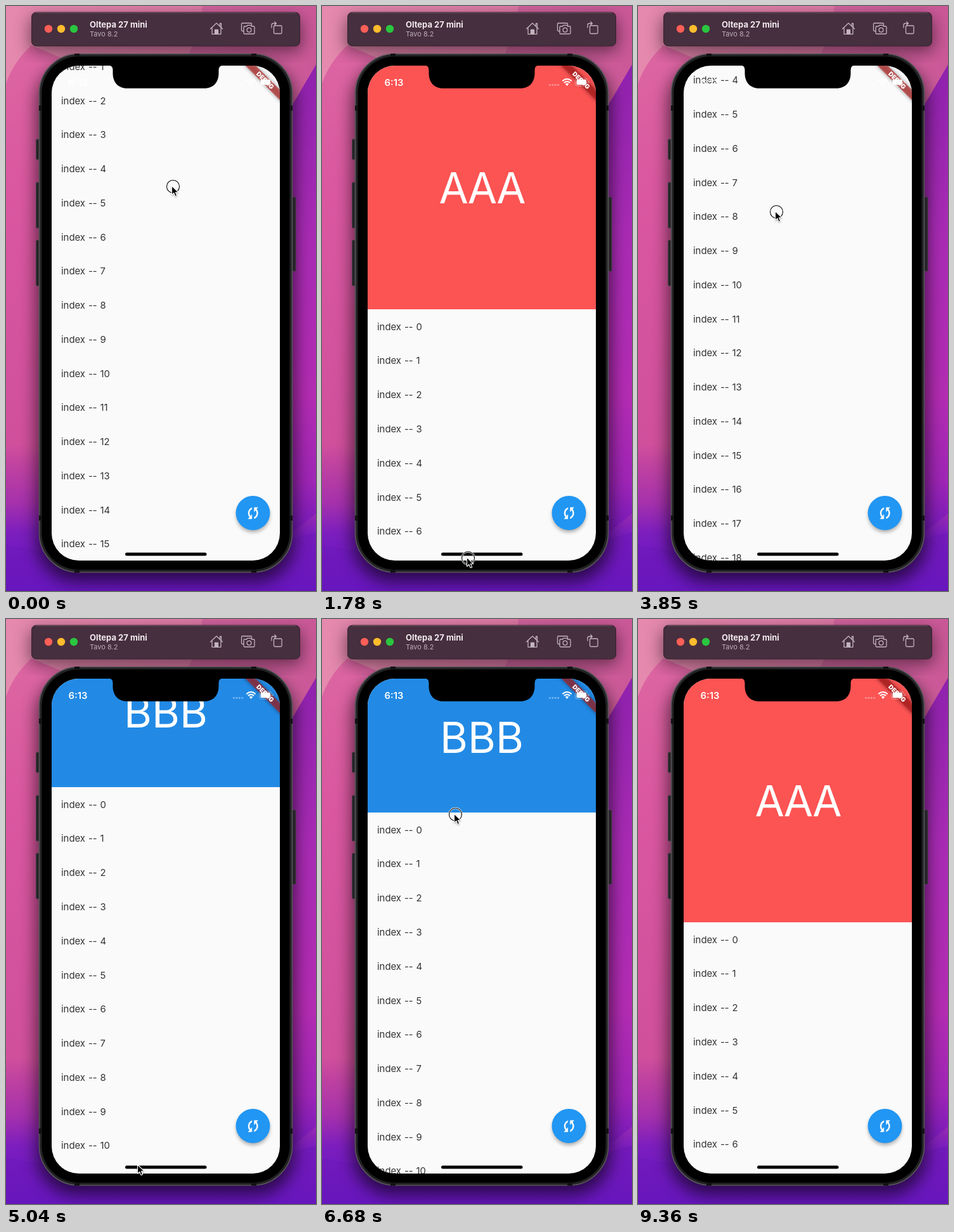
An HTML page that plays this animation: 489x922 px, repeating every 9510 ms.

```html
<!DOCTYPE html>
<html lang="en">
<head>
<meta charset="utf-8">
<title>List with a changing header</title>
<style>
  html, body { margin: 0; width: 100%; height: 100%; overflow: hidden; background: #a32bb0; }
  svg { display: block; width: 489px; height: 922px; }
  text { font-family: Inter, Roboto, "Liberation Sans", sans-serif; }
  .row { font-size: 14.9px; word-spacing: .7px; fill: #333; }
  .big { font-size: 67.2px; fill: #fff; text-anchor: middle; }
  .line { fill: none; stroke: #c3b4be; stroke-width: 1.3; stroke-linejoin: round; stroke-linecap: round; }
</style>
</head>
<body>
<svg viewBox="0 0 489 922" xmlns="http://www.w3.org/2000/svg">
  <defs>
    <linearGradient id="left" x2="0" y2="1">
      <stop offset="0" stop-color="#dd6aa3"/>
      <stop offset=".3" stop-color="#da58a0"/>
      <stop offset=".75" stop-color="#d0509c"/>
      <stop offset=".78" stop-color="#c2449f"/>
      <stop offset=".85" stop-color="#a531ac"/>
      <stop offset=".9" stop-color="#7d1ebe"/>
      <stop offset="1" stop-color="#5d14c4"/>
    </linearGradient>
    <linearGradient id="right" x2="0" y2="1">
      <stop offset="0" stop-color="#8f22ae"/>
      <stop offset=".35" stop-color="#a82bb4"/>
      <stop offset=".7" stop-color="#b32cb2"/>
      <stop offset=".88" stop-color="#9e25b6"/>
      <stop offset="1" stop-color="#7018bc"/>
    </linearGradient>
    <linearGradient id="top">
      <stop offset="0" stop-color="#e58aae"/>
      <stop offset=".6" stop-color="#df7aa6"/>
      <stop offset="1" stop-color="#cf5c98"/>
    </linearGradient>
    <filter id="blur" x="-30%" y="-30%" width="160%" height="160%"><feGaussianBlur stdDeviation="13"/></filter>
    <filter id="soft" x="-50%" y="-50%" width="200%" height="200%"><feGaussianBlur stdDeviation="3"/></filter>
    <clipPath id="screen"><rect x="72" y="94" width="360" height="780" rx="43"/></clipPath>
  </defs>

  <!-- wallpaper -->
  <rect width="489" height="922" fill="url(#left)"/>
  <path d="M489 92L440 175V840L489 800Z" fill="url(#right)"/>
  <path d="M0 0H489V92L455 150H250L40 62Q12 88 0 122Z" fill="url(#top)"/>
  <path d="M310 0H489V92L455 150H240Q300 80 310 0Z" fill="#c9569a" opacity=".55"/>
  <path d="M0 850L250 890L489 830V922H0Z" fill="#6f18ba" opacity=".6"/>

  <!-- window bar -->
  <rect x="38" y="18" width="428" height="54" rx="8" filter="url(#blur)" opacity=".5"/>
  <rect x="40.5" y="10" width="423" height="53" rx="7" fill="#462f3e" stroke="#34232f"/>
  <path d="M47 10.8H457" stroke="#75606c" stroke-width=".8"/>
  <circle cx="67" cy="36" r="6.2" fill="#fe5f57"/>
  <circle cx="87" cy="36" r="6.2" fill="#febc2e"/>
  <circle cx="107" cy="36" r="6.2" fill="#2ac63f"/>
  <text x="132" y="34" font-size="13" font-weight="700" fill="#f2eaef">Oltepa 27 mini</text>
  <text x="132" y="48" font-size="11" fill="#bcaeb7">Tavo 8.2</text>
  <g class="line">
    <path d="M322.5 36L332 27L341.5 36M325 34V44.3H339V34M337.5 31V27.5H339.5V33"/>
    <path d="M329.5 44V37.5H334.5V44Z" fill="#c3b4be"/>
    <path d="M374.5 39.5H373Q371.5 39.5 371.5 38V28.5Q371.5 27 373 27H386Q387.5 27 387.5 28.5V30"/>
    <path d="M376.5 32H379.5L381 30.3H386L387.5 32H390.5Q392 32 392 33.5V42.5Q392 44 390.5 44H376.5Q375 44 375 42.5V33.5Q375 32 376.5 32Z"/>
    <circle cx="383.5" cy="37.8" r="3.4"/>
    <rect x="422.5" y="31" width="12.5" height="12.5" rx="1.5"/>
    <path d="M419 34V30Q419 27.5 421.5 27.5H426M423.8 25L426.3 27.5L423.8 30"/>
  </g>

  <!-- device -->
  <rect x="48" y="88" width="408" height="820" rx="64" filter="url(#blur)" opacity=".6"/>
  <g fill="#252427" stroke="#48424a" stroke-width=".8">
    <rect x="47.5" y="210" width="7" height="32" rx="1.5"/>
    <rect x="47.5" y="278" width="7" height="72" rx="1.5"/>
    <rect x="47.5" y="369" width="7" height="72" rx="1.5"/>
    <rect x="450" y="301" width="7" height="117" rx="1.5"/>
  </g>
  <rect x="52.5" y="75.5" width="399" height="817" rx="62" fill="#232325" stroke="#59565a" stroke-width="1.6"/>
  <path d="M108 77H116M387 77H395M108 891H116M387 891H395M54 157V165M450 157V165M54 803V811M450 803V811" stroke="#121213" stroke-width="4"/>
  <rect x="56.5" y="79.5" width="391" height="809" rx="58" fill="#000"/>

  <g clip-path="url(#screen)">
    <rect x="72" y="94" width="360" height="780" fill="#fafafa"/>
    <rect id="header" x="72" y="94" width="360"/>
    <text id="title" class="big" x="252"></text>
    <g id="list"></g>

    <circle cx="389.5" cy="803" r="26" filter="url(#soft)" opacity=".35"/>
    <circle cx="389.5" cy="799" r="27" fill="#2196f3"/>
    <g transform="translate(389.7 799.3) scale(.96 1.12)" fill="#fff" stroke="#fff" stroke-width=".5">
      <path id="arrow" d="M-2-7.740C-5.450-6.850-8-3.730-8 0C-8 2.210-7.090 4.200-5.640 5.640L-8 8H-2V2L-4.240 4.240C-5.320 3.150-6 1.660-6 0C-6-2.610-4.330-4.830-2-5.650Z"/>
      <use href="#arrow" transform="rotate(180)"/>
    </g>

    <g transform="translate(432 94) rotate(45)">
      <rect x="-60" y="27" width="120" height="11.5" filter="url(#soft)" opacity=".4"/>
      <rect x="-60" y="26.9" width="120" height="11.5" fill="#b71c1c" fill-opacity=".63"/>
      <text y="36.2" font-size="9.8" font-weight="900" fill="#fff" text-anchor="middle">DEBUG</text>
    </g>

    <g fill="#fff">
      <text x="98.5" y="125.6" font-size="14.8" font-weight="600">6:13</text>
      <g opacity=".35">
        <circle cx="359.5" cy="124.3" r="1.6"/><circle cx="363.9" cy="124.3" r="1.6"/>
        <circle cx="368.3" cy="124.3" r="1.6"/><circle cx="372.7" cy="124.3" r="1.6"/>
      </g>
      <path d="M386.5 126L383.7 122.8Q386.5 120.8 389.3 122.8Z"/>
      <path d="M381.8 121Q386.5 117 391.2 121M379.3 118.2Q386.5 111.8 393.7 118.2" fill="none" stroke="#fff" stroke-width="2"/>
      <rect x="401.5" y="115.8" width="15.5" height="8.4" rx="2"/>
      <rect x="399.5" y="113.9" width="19.5" height="12.2" rx="3.5" fill="none" stroke="#fff" stroke-opacity=".4"/>
      <path d="M420.3 118V122Q421.8 121.5 421.8 120T420.3 118Z" opacity=".45"/>
    </g>
    <rect x="188" y="861.5" width="128.5" height="5" rx="2.5"/>
  </g>
  <path d="M162 93.5Q168.5 94 168.5 101V106C168.500 120 177 129.800 191 129.800H313C327 129.800 335.500 120 335.500 106V101Q335.5 94 342 93.5Z"/>

  <g id="cursor">
    <g id="ring" fill="none">
      <circle r="10" stroke="#fff" stroke-width="2.4"/>
      <circle r="10" stroke="#000" stroke-width="1.1"/>
    </g>
    <path d="M-2-1V13.3L1.3 10.2L3.6 15.6L6.2 14.5L3.9 9.2H8.4Z" stroke="#fff" stroke-width="1.1" stroke-linejoin="round" style="filter:drop-shadow(0 1px 1px rgba(0,0,0,.35))"/>
  </g>
</svg>
<script>
const $ = id => document.getElementById(id);
const LOOP = 9510, TOP = 94, PITCH = 53.76;
const RED = { name: 'AAA', fill: '#fc5353', height: 384, spacing: -2 };
const BLUE = { name: 'BBB', fill: '#228ae5', height: 238, spacing: 0 };

const shortTicks = [0, 5, 14, 20, 25, 30, 42, 45, 50];
const starts = Array.from({ length: 64 }, (_, k) =>
  150 * k - 10 * shortTicks.filter(s => s < k).length);

const ease = {
  both: p => (1 - Math.cos(Math.PI * p)) / 2,
  in: p => p * p,
  out: p => p * (2 - p)
};

// time, pointer x, pointer y, top of the list, pressed, easing
const keys = [
  [0, 263.5, 284.5, 14.3, 1],
  [140, 263.5, 284.5, 14.3, 0],
  [290, 263.5, 284.5, 14.3, 0],
  [1780, 230.5, 870, 600, 1],
  [2670, 222, 318, -74, 1],
  [2820, 222, 318, -74, 1],
  [3260, 224, 783, 391, 1],
  [3850, 218.5, 324.5, -125.5, 1],
  [4000, 218, 310, -140, 1],
  [4450, 213, 560, 110, 1, 'in'],
  [5040, 209.5, 861, 265, 0, 'out'],
  [5340, 209.5, 861, 272, 0, 'out'],
  [5640, 209.5, 861, 272, 0],
  [6390, 212, 275, 272, 0],
  [6680, 210.5, 308, 305, 1, 'in'],
  [7270, 214, 820, 817, 1],
  [8010, 216.5, 506, 18, 1, 'in'],
  [8160, 218, 400, -88, 1, 'out'],
  [8620, 250, 770, 282, 1, 'in'],
  [8900, 310, 845, 478, 0, 'out'],
  [9060, 382.5, 852, 478, 0],
  [9210, 438, 907, 478, 0],
  [9360, 475, 960, 478, 0]
];

const headerAt = t => t >= 2820 && t < 8160 ? BLUE : RED;

function pose(t) {
  const i = Math.max(1, keys.findIndex(k => t <= k[0]));
  const a = keys[i - 1], b = keys[i];
  const p = ease[b[5] || 'both']((t - a[0]) / (b[0] - a[0]));
  const mix = (n, limit = Infinity) => {
    const from = Math.min(a[n], limit);
    return Math.min(limit, from + (b[n] - from) * p);
  };
  const head = headerAt(t);
  return { x: mix(1), y: mix(2), top: mix(3, TOP + head.height), down: t === 0 || b[4], head };
}

for (let i = 0; i < 24; i++) {
  const row = document.createElementNS('http://www.w3.org/2000/svg', 'text');
  row.setAttribute('class', 'row');
  row.setAttribute('x', 87);
  row.setAttribute('y', 32.7 + i * PITCH);
  row.textContent = 'index -- ' + i;
  $('list').append(row);
}

function draw(t) {
  const { x, y, top, down, head } = pose(t);
  $('header').setAttribute('height', Math.max(0, top - TOP));
  $('header').setAttribute('fill', head.fill);
  $('title').setAttribute('y', top - head.height / 2 + 25);
  $('title').setAttribute('letter-spacing', head.spacing);
  $('title').textContent = top > TOP ? head.name : '';
  $('list').setAttribute('transform', `translate(0 ${top})`);
  $('cursor').setAttribute('transform', `translate(${x} ${y})`);
  $('ring').setAttribute('visibility', down ? 'visible' : 'hidden');
}

const begin = performance.now();
function tick() {
  const t = (performance.now() - begin) % LOOP;
  draw(starts.findLast(s => s <= t));
  requestAnimationFrame(tick);
}
tick();
</script>
</body>
</html>
```
